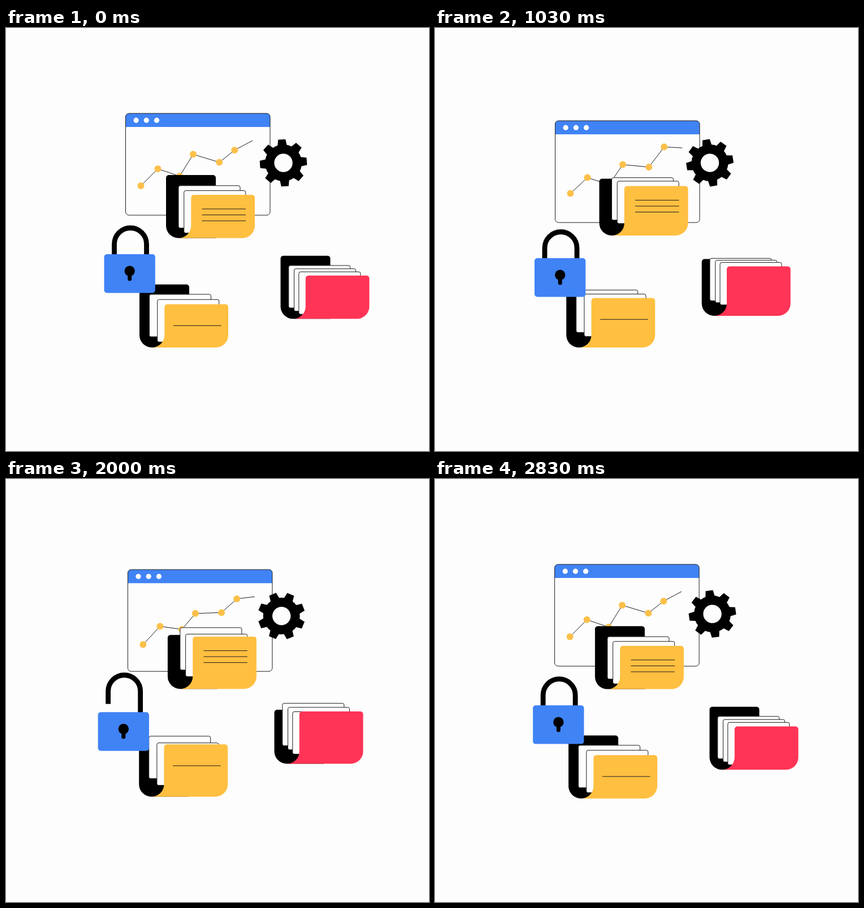
An HTML page with a canvas for the animation above (2.86 s loop, 748 px wide and 748 px high).

```html
<!DOCTYPE html>
<html lang="en">
<head>
<meta charset="utf-8">
<title>Secure documents</title>
<style>
  html, body { margin: 0; width: 100%; height: 100%; overflow: hidden; background: #fdfdfd; }
  canvas { display: block; width: 748px; height: 748px; }
</style>
</head>
<body>
<canvas id="stage" width="748" height="748"></canvas>
<script>
const ctx = document.getElementById('stage').getContext('2d');
const LOOP = 2860;
const KEYS = [0, 630, 1030, 1370, 1770, 2230];
const PAPER = '#fdfdfd', INK = '#000', BLUE = '#4083f5', YELLOW = '#ffbf40', RED = '#ff3456';
const LINE = '#1c1c1c';

// Smooth periodic curve through one value per key time.
function track(...values) {
  const n = KEYS.length;
  const time = i => KEYS[(i + n) % n] + LOOP * Math.floor(i / n);
  const value = i => values[(i + n) % n];
  const slope = i => {
    const a = time(i) - time(i - 1), b = time(i + 1) - time(i);
    const da = (value(i) - value(i - 1)) / a, db = (value(i + 1) - value(i)) / b;
    return (da * b + db * a) / (a + b);
  };
  return t => {
    let i = n - 1;
    while (KEYS[i] > t) i--;
    const span = time(i + 1) - time(i), u = (t - time(i)) / span;
    const u2 = u * u, u3 = u2 * u;
    return value(i) * (2 * u3 - 3 * u2 + 1) + value(i + 1) * (3 * u2 - 2 * u3)
      + span * (slope(i) * (u3 - 2 * u2 + u) + slope(i + 1) * (u3 - u2));
  };
}

// 0 = folder open, 1 = folder closed; two swings per loop.
const swing = (t, lag) => (1 - Math.cos(4 * Math.PI * (t - lag) / LOOP)) / 2;
const smooth = (a, b, t) => {
  const u = Math.min(1, Math.max(0, (t - a) / (b - a)));
  return u * u * (3 - 2 * u);
};

function box(x, y, w, h, r, fill, stroke) {
  ctx.beginPath();
  ctx.roundRect(x, y, w, h, r);
  if (fill) { ctx.fillStyle = fill; ctx.fill(); }
  if (stroke) { ctx.strokeStyle = stroke; ctx.lineWidth = 1; ctx.stroke(); }
}
function disc(x, y, r, fill) {
  ctx.beginPath();
  ctx.arc(x, y, r, 0, 2 * Math.PI);
  ctx.fillStyle = fill;
  ctx.fill();
}
function polyline(points, color, width) {
  ctx.beginPath();
  points.forEach(p => ctx.lineTo(...p));
  ctx.strokeStyle = color;
  ctx.lineWidth = width;
  ctx.stroke();
}
function at(x, y, draw) {
  ctx.save();
  ctx.translate(x, y);
  draw();
  ctx.restore();
}

const panel = {
  x: track(211.5, 210.5, 212.5, 214.5, 216.3, 214),
  y: track(151, 159, 164, 165, 163, 157),
  chart: [
    [27, track(128, 131.5, 128.5, 126.5, 129, 135.5)],
    [57, track(98, 102, 100.5, 103.5, 105, 95.3)],
    [95.5, track(111, 111, 113, 111, 105, 108)],
    [119.5, track(72.3, 78, 77.5, 77.7, 79.3, 75.5)],
    [165.7, track(86.5, 87.3, 82, 80, 76.6, 76.8)],
    [192.7, track(65, 51.5, 46.3, 46.3, 49, 55)],
    [224.5, () => 48]
  ]
};
const gear = {
  x: track(490.5, 487.6, 486, 485.5, 486, 488.5),
  y: track(238.5, 237.2, 238.4, 240.3, 242, 242)
};
const lock = {
  x: track(173.5, 178, 176, 171, 164.5, 162.6),
  y: track(400, 403, 407, 411, 413.3, 410)
};

// sheets: [left, height above the base when open, travel, lag]
const folders = [
  {
    color: YELLOW,
    x: track(283, 289, 290.5, 290, 287.5, 284.5),
    y: track(371.5, 367.6, 367, 368, 370, 372),
    sheets: [[22, 92.7, 17, -12], [31.7, 83.5, 17, 75]],
    rules: [[63.5, 141, 25], [63.5, 141, 35.5], [63.5, 141, 46]]
  },
  {
    color: YELLOW,
    x: track(236, 233, 232.2, 233, 234.5, 235.7),
    y: track(565, 566, 565, 564, 562.5, 561.5),
    sheets: [[17.5, 94, 14, -20], [31.7, 84.5, 13.5, 75]],
    rules: [[60, 144.5, 37.8]]
  },
  {
    color: RED,
    x: track(485.5, 477.5, 471.7, 470, 471.5, 478),
    y: track(514.3, 513, 509, 505.2, 502.6, 505.5),
    sheets: [[14.3, 94.3, 13.5, -20], [24, 88.3, 14, 60], [32.3, 82, 14.7, 130]],
    rules: []
  }
];

function drawPanel(t) {
  at(panel.x(t), panel.y(t), () => {
    box(0, 0, 255.5, 180, 6, PAPER);
    box(0, 0, 255.5, 24, [6, 6, 0, 0], BLUE);
    box(0, 0, 255.5, 180, 6, null, LINE);
    [18.6, 36.8, 55].forEach(x => disc(x, 12.2, 4.6, '#fff'));
    const points = panel.chart.map(([x, y]) => [x, y(t)]);
    polyline(points, LINE, 1);
    points.slice(0, -1).forEach(([x, y]) => disc(x, y, 6, '#fcc04a'));
  });
}

function drawGear(t) {
  at(gear.x(t), gear.y(t), () => {
    ctx.rotate((t / LOOP * 360 - 4) * Math.PI / 180);
    ctx.fillStyle = INK;
    for (let i = 0; i < 8; i++) {
      ctx.beginPath();
      ctx.moveTo(-8.5, -29);
      ctx.lineTo(-6.5, -41.5);
      ctx.lineTo(6.5, -41.5);
      ctx.lineTo(8.5, -29);
      ctx.fill();
      ctx.rotate(Math.PI / 4);
    }
    disc(0, 0, 32.5, INK);
    disc(0, 0, 16.2, PAPER);
  });
}

function drawFolder(f, t) {
  const closed = swing(t, 10);
  const back = 111.5 - 18 * closed, front = 76.5 + 18 * closed;
  at(f.x(t), f.y(t), () => {
    box(0, -back, 88, back, [5, 5, 0, 22], INK);
    for (const [x, h, travel, lag] of f.sheets) {
      box(x, -h - travel * swing(t, lag), 109, 75, 3, PAPER, LINE);
    }
    ctx.beginPath();
    ctx.moveTo(44.3, -front + 5);
    ctx.arcTo(44.3, -front, 50, -front, 5);
    ctx.arcTo(157, -front, 157, -22, 5);
    ctx.arcTo(157, 0, 135, 0, 22);
    ctx.lineTo(22.3, 0);
    ctx.arc(22.3, -22, 22, Math.PI / 2, 0, true);
    ctx.closePath();
    ctx.fillStyle = f.color;
    ctx.fill();
    f.rules.forEach(([a, b, y]) => polyline([[a, y - front], [b, y - front]], LINE, 1));
  });
}

function drawLock(t) {
  const half = t % (LOOP / 2);
  const lift = 19 * (smooth(70, 320, half) - smooth(810, 1020, half));
  at(lock.x(t), lock.y(t), () => {
    ctx.beginPath();
    ctx.moveTo(18, 4.5 - lift);
    ctx.arc(46.5, -18 - lift, 28.5, Math.PI, 0);
    ctx.lineTo(75, 30 - lift);
    ctx.strokeStyle = INK;
    ctx.lineWidth = 8.8;
    ctx.stroke();
    box(0, 0, 90.3, 68.4, 5, BLUE);
    disc(45.2, 29.7, 9.2, INK);
    box(41.7, 30, 7, 17.3, 3.5, INK);
  });
}

function frame(now) {
  const t = now % LOOP;
  ctx.fillStyle = PAPER;
  ctx.fillRect(0, 0, 748, 748);
  drawPanel(t);
  drawGear(t);
  folders.forEach(f => drawFolder(f, t));
  drawLock(t);
}

const start = performance.now();
function tick() {
  frame(performance.now() - start);
  requestAnimationFrame(tick);
}
tick();
</script>
</body>
</html>
```
